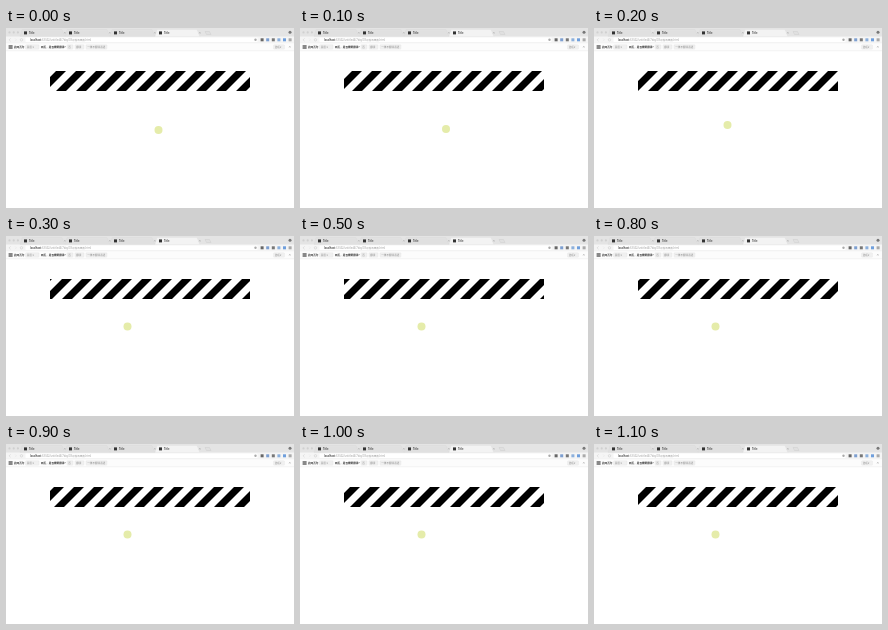
Write an HTML page that moves like this. It is 288 px wide and 180 px high and loops after 1200 ms.

```html
<!DOCTYPE html>
<html lang="zh">
<head>
<meta charset="utf-8">
<title>Stripes</title>
<style>
  html, body { margin: 0; width: 100%; height: 100%; overflow: hidden; background: #fff; }
  svg { display: block; width: 100vw; height: 100vh; }
  text { font-family: "Noto Sans CJK SC", "Noto Sans CJK", "Open Sans", sans-serif; font-size: 2.6px; fill: #888; }
  .latin { font-family: "Open Sans", Arial, sans-serif; }
  .dark { fill: #333; font-weight: 600; }
</style>
</head>
<body>
<svg viewBox="0 0 288 180" xmlns="http://www.w3.org/2000/svg">
  <defs>
    <clipPath id="bar"><rect x="44" y="43" width="200" height="20"/></clipPath>
  </defs>
  <rect width="288" height="180" fill="#fff"/>
  <rect width="288" height="8.8" fill="#e4e4e4"/>
  <g id="tabs"></g>
  <rect y="8.8" width="288" height="6" fill="#f5f5f5"/>
  <g fill="none" stroke="#bbb" stroke-width=".4">
    <path d="M4.5 10.4 L3.1 11.8 L4.5 13.2"/>
    <path d="M9 10.4 L10.4 11.8 L9 13.2" stroke="#ddd"/>
    <circle cx="15.5" cy="11.8" r="1.2"/>
  </g>
  <rect x="19.5" y="9.6" width="232" height="4.4" rx=".8" fill="#fff"/>
  <text class="latin" x="24" y="12.8" font-size="2.8"><tspan class="dark">localhost</tspan><tspan fill="#999">:63342/untitled4/7day/03过程效果图.html</tspan></text>
  <g id="tools"></g>
  <rect y="14.8" width="288" height="8" fill="#fcfcfc"/>
  <path d="M0 14.8H288M0 22.8H288" stroke="#e6e6e6" stroke-width=".4"/>
  <rect x="2.6" y="17" width="4" height="4" fill="#888"/>
  <text class="dark" x="8" y="19.9">此网页为</text>
  <text class="dark" x="35" y="19.9">网页，是否需要翻译？</text>
  <g id="buttons"></g>
  <path d="M283 18 l1.6 1.6 m0 -1.6 l-1.6 1.6" stroke="#999" stroke-width=".4"/>
  <g clip-path="url(#bar)"><path id="stripes"/></g>
  <circle id="pointer" r="4" fill="#e5ecaa"/>
</svg>
<script>
const LOOP = 1200, STEP = 100, PERIOD = 20;
const get = id => document.getElementById(id);

get("tabs").innerHTML = [18, 63, 108, 153].map((x, i) => `
  <path d="M${x - 4} 8.8 L${x - 2} 1.6 H${x + 38} L${x + 41} 8.8 Z" fill="${i === 3 ? "#f3f3f3" : "#e0e0e0"}" stroke="#cfcfcf" stroke-width=".2"/>
  <rect x="${x}" y="3.4" width="3" height="3" fill="#333"/>
  <text class="latin dark" x="${x + 5}" y="5.8">Title</text>
  <path d="M${x + 40.2} 4.2 l1.3 1.3 m0 -1.3 l-1.3 1.3" stroke="#888" stroke-width=".35"/>`).join("") +
  [3.5, 7.7, 11.9].map(x => `<circle cx="${x}" cy="4.4" r="1.1" fill="#d0d0d0"/>`).join("") +
  `<path d="M199 3.5 h4.5 l1.5 3 h-4.5 Z" fill="#e0e0e0" stroke="#bbb" stroke-width=".25"/>
   <circle cx="284" cy="4.2" r="1.5" fill="#777"/>`;

get("tools").innerHTML = ["#666", "#7d9fd0", "#777", "#8cb0dc", "#6f9fdc", "#aaa"].map((color, i) =>
  `<rect x="${254.6 + i * 5.6}" y="10.3" width="3" height="3" fill="${color}"/>`).join("") +
  `<circle cx="249.5" cy="11.8" r="1.2" fill="#aaa"/>`;

const button = (x, width, label) => `
  <rect x="${x}" y="16.8" width="${width}" height="4.4" rx=".6" fill="#f0f0f0" stroke="#ddd" stroke-width=".25"/>
  <text x="${x + 1.2}" y="19.9">${label}</text>`;
get("buttons").innerHTML = button(19.5, 13.5, "英语 ▾") + button(61, 6, "否") +
  button(69, 9, "翻译") + button(80, 21, "一律不翻译英语") + button(267.5, 11, "选项▾");

function stripePath(offset) {
  let path = "";
  for (let x = 24 + offset; x < 284; x += PERIOD) {
    path += `M${x - 10} 43h10l-20 20h-10Z`;
  }
  return path;
}

const trail = [[152.5, 102], [146, 101], [133.5, 97], [121.5, 90.5]];

function draw(time) {
  const step = Math.floor((time % LOOP) / STEP);
  const [x, y] = trail[Math.min(step, trail.length - 1)];
  get("stripes").setAttribute("d", stripePath((step * 2 + 16) % PERIOD));
  get("pointer").setAttribute("cx", x);
  get("pointer").setAttribute("cy", y);
}

const start = performance.now();
function tick() {
  draw(performance.now() - start);
  requestAnimationFrame(tick);
}
draw(0);
requestAnimationFrame(tick);
</script>
</body>
</html>
```
